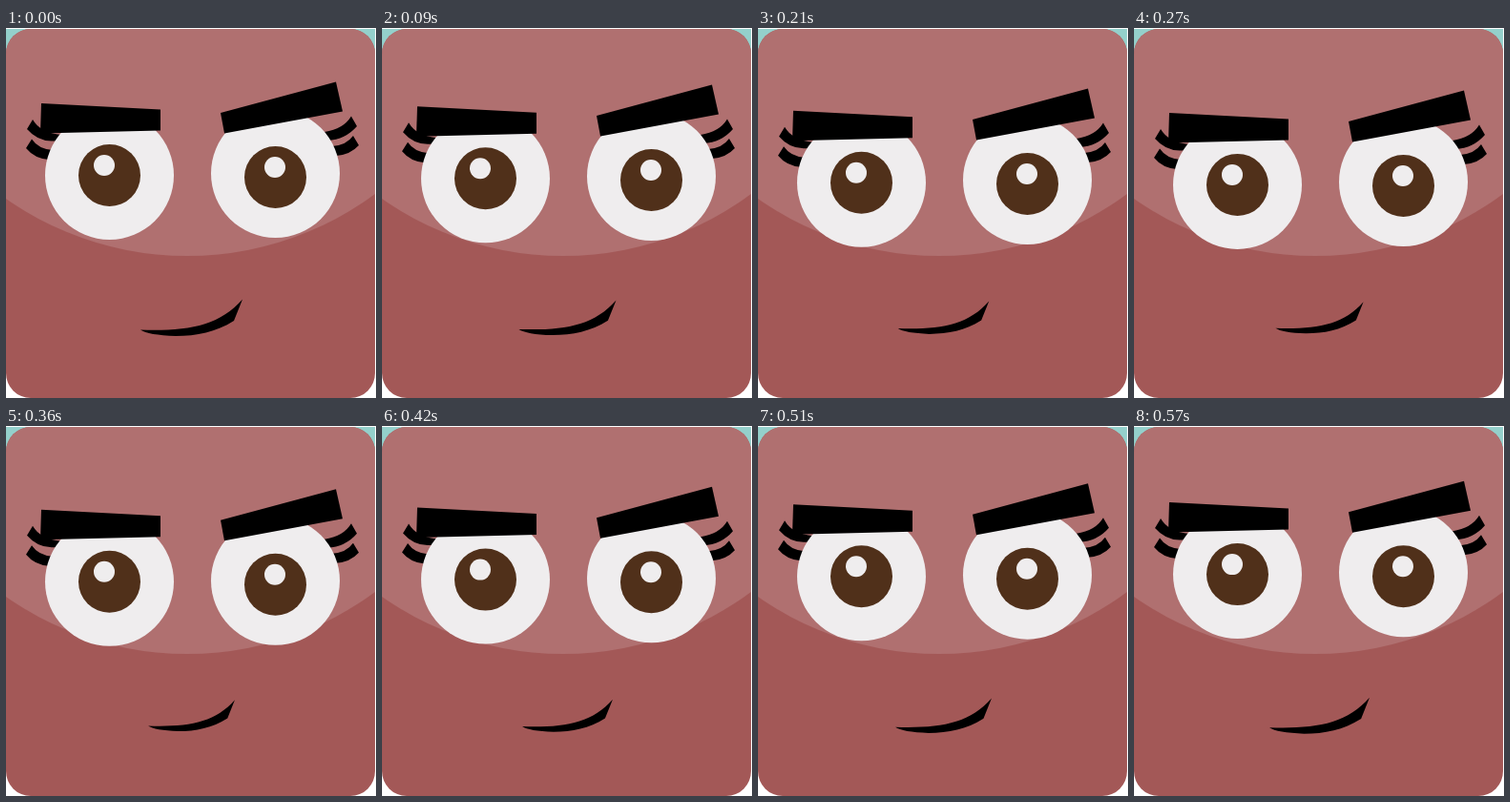
An HTML page that plays this animation: 388 by 388 pixels, repeating every 0.6 s.

```html
<!DOCTYPE html>
<html>
<head>
<meta charset="utf-8">
<style>
html, body { margin: 0; width: 100%; height: 100%; overflow: hidden; background: #fff; }
svg { display: block; width: 100vw; height: 100vh; }
</style>
</head>
<body>
<svg viewBox="0 0 388 388">
  <clipPath id="face"><rect y="1" width="387" height="387" rx="26"/></clipPath>
  <rect y="1" width="387" height="30" fill="#94d0cb"/>
  <g clip-path="url(#face)">
    <rect width="388" height="388" fill="#a35857"/>
    <circle cx="190" cy="-92" r="331" fill="#b07070"/>
  </g>
  <g id="left">
    <path d="M28 96Q36 110 58 112L54 118Q35 121 22 106ZM27 116.500Q34 127 49 128L45 138Q30 137 21 126Z"/>
    <circle cx="108.500" cy="154.500" r="67.500" fill="#efedee"/>
    <circle cx="108.500" cy="154.500" r="32.500" fill="#50301a"/>
    <circle cx="103" cy="144" r="11" fill="#efedee"/>
    <path d="M37 79L162 85.500V107.500L36 110.500Z"/>
  </g>
  <g id="right">
    <path d="M362 92.500Q354 106 334 109L337 118Q356 117 368 103ZM364 113Q357 123 342 124L346 134Q361 133 370 123Z"/>
    <circle cx="282.500" cy="152.500" r="67.500" fill="#efedee"/>
    <circle cx="282.500" cy="156.500" r="32.500" fill="#50301a"/>
    <circle cx="282" cy="146" r="11" fill="#efedee"/>
    <path d="M225 89L346 56.500L353 87.500L229 110.500Z"/>
  </g>
  <path id="mouth" d="M141 316.500C190 318 223 313 248 284.500L239 307C220 319 200 323 178 323Q149 322 141 316.500Z"/>
</svg>
<script>
const LOOP = 600, STEP = 30, DROP = 11;
const [left, right, mouth] = ['left', 'right', 'mouth'].map(id => document.getElementById(id));

// Linear rise to 1 at the peak time, then linear fall back to 0
const wave = (t, peak) => t < peak ? t / peak : (LOOP - t) / (LOOP - peak);

function draw() {
  const t = Math.floor(performance.now() % LOOP / STEP) * STEP;
  const early = wave(t, 300), late = wave(t, 330);
  left.setAttribute('transform', `translate(0 ${DROP * early})`);
  right.setAttribute('transform', `translate(0 ${DROP * late})`);
  mouth.setAttribute('transform',
    `translate(194.500 303.500) scale(${1 - 0.17 * late}) translate(-194.500 -303.500)`);
  requestAnimationFrame(draw);
}
draw();
</script>
</body>
</html>
```
